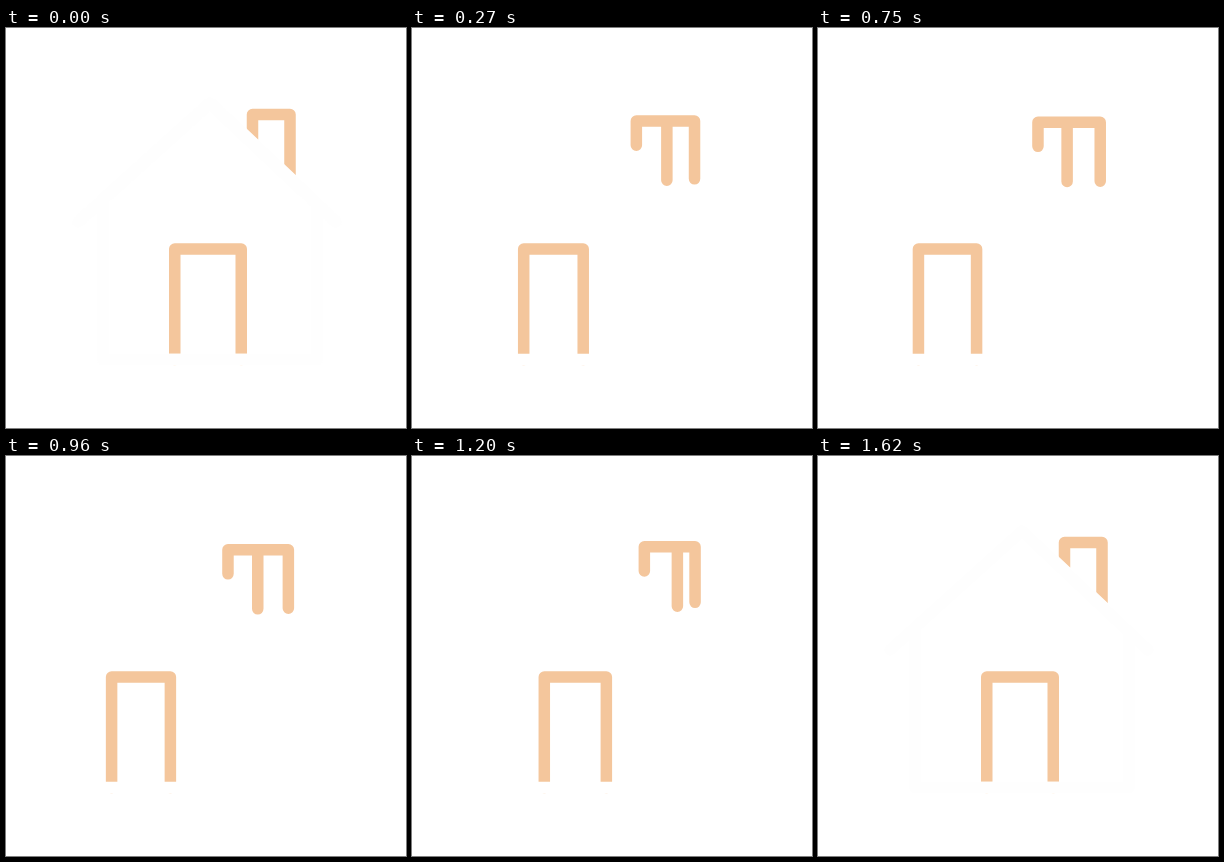
These frames come from a looping animation (400 by 400 pixels, 3650 ms). An HTML page:

```html
<!DOCTYPE html>
<html lang="en">
<head>
<meta charset="utf-8">
<title>House</title>
<style>
  html, body { margin: 0; width: 100%; height: 100%; overflow: hidden; background: #fff; }
  svg { display: block; width: 100%; height: 100%; }
  path { fill: none; stroke-width: 11.5; stroke-linejoin: round; stroke-linecap: round; }
  .ink { stroke: #f4c69c; }
  .cover { stroke: #fff; }
  #outline { stroke: #fefefe; }
  #eave { stroke-width: 13; }
</style>
</head>
<body>
<svg viewBox="0 0 400 400">
  <path id="chimney" class="ink"/>
  <path id="door" class="ink"/>
  <path id="eave" class="cover" d="M204 75L330 194"/>
  <path class="cover" stroke-linecap="butt" d="M60 331.6H330"/>
  <path id="outline" d="M72 194L204 75L330 194M97 175V331.6H311V175"/>
</svg>
<script>
  const LOOP = 3650, STEP = 30, TURN_OUT = 520, TURN_BACK = 540, FRONT = 1620;
  const [chimney, door, eave, outline] =
    ['chimney', 'door', 'eave', 'outline'].map(id => document.getElementById(id));

  const mix = (a, b, p) => a + (b - a) * p;

  function bezier(x1, y1, x2, y2) {
    const at = (a, b, s) => 3 * s * (1 - s) * ((1 - s) * a + s * b) + s ** 3;
    return u => {
      if (u <= 0) return 0;
      if (u >= 1) return 1;
      let lo = 0, hi = 1;
      for (let i = 0; i < 30; i++) {
        const s = (lo + hi) / 2;
        if (at(x1, x2, s) < u) lo = s; else hi = s;
      }
      return at(y1, y2, lo);
    };
  }

  const easeOut = bezier(.25, .1, .25, 1);
  const easeBack = bezier(.95, 0, .36, 1);

  // 1 = facing front, 0 = fully turned
  function facing(t) {
    return t < TURN_BACK
      ? 1 - easeOut(t / TURN_OUT)
      : easeBack((t - TURN_BACK) / (FRONT - TURN_BACK));
  }

  function draw(p) {
    const v = (turned, front) => mix(turned, front, p).toFixed(2);

    const top = v(94.5, 86.5);
    chimney.setAttribute('d',
      `M${v(219.5, 246.5)} ${v(118.5, 111)}V${top}H${v(282.2, 284)}V${v(153.5, 138.5)}` +
      `M${v(248.5, 284)} ${top}V${v(153.5, 146.5)}`);

    door.setAttribute('d',
      `M${v(99.25, 168.75)} 331.6V221H${v(157.25, 235.25)}V331.6`);

    eave.setAttribute('transform', `translate(0 ${v(93, 0)})`);
    outline.setAttribute('opacity', p > .99 ? 1 : 0);
  }

  const start = performance.now();
  function tick() {
    const t = (performance.now() - start) % LOOP;
    draw(facing(Math.floor(t / STEP) * STEP));
    requestAnimationFrame(tick);
  }
  tick();
</script>
</body>
</html>
```
